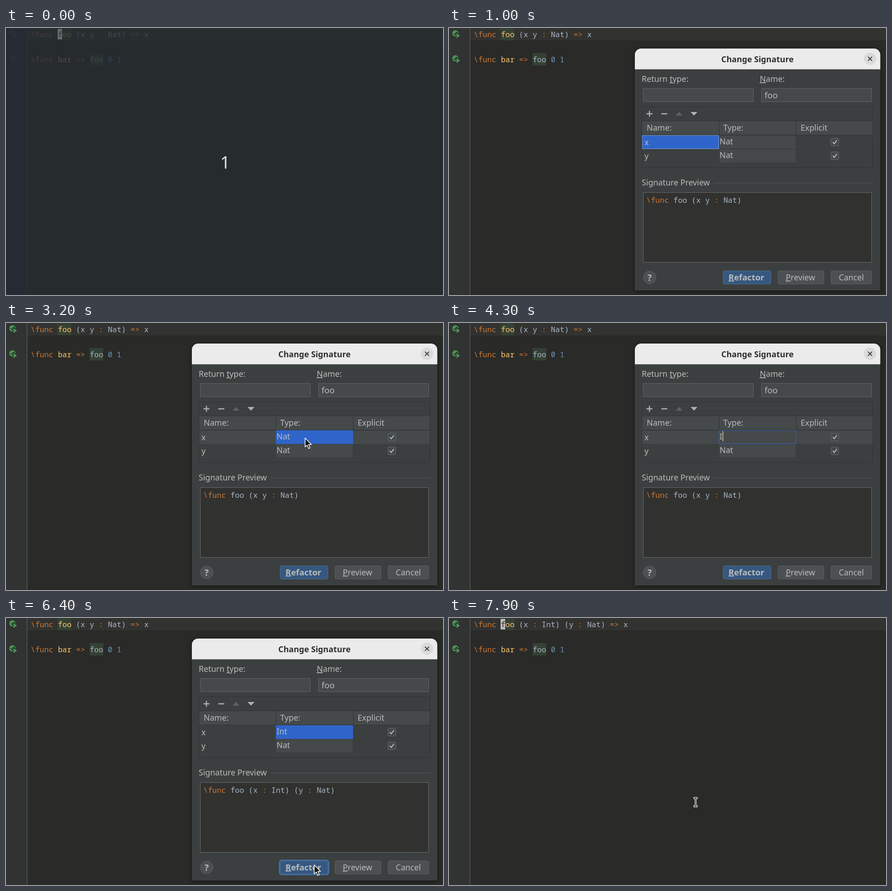
Write an HTML page that moves like this. It is 957 px wide and 585 px high and loops after 8000 ms.

```html
<!DOCTYPE html>
<html lang="en">
<head>
<meta charset="utf-8">
<title>Change Signature</title>
<style>
  html, body { margin: 0; width: 100%; height: 100%; overflow: hidden; background: #2a2a28; }
  svg { display: block; width: 957px; height: 585px; }
  text { white-space: pre; fill: #bbb; font: 17.7px "Noto Sans", "Open Sans", sans-serif; }
  .code { font: 16.57px "Noto Sans Mono", "DejaVu Sans Mono", monospace; fill: #a9b7c6; font-variant-ligatures: none; }
  .kw { fill: #cc7832; }
  .fn { fill: #ffc66d; }
  .num { fill: #6897bb; }
  .b { font-weight: 700; }
  .u { text-decoration: underline; }
  .field { fill: #45494a; stroke: #646464; }
  .cell { fill: #45494a; }
  .button { fill: #4c5052; stroke: #5e6060; }
  .rule { stroke: #323232; fill: none; }
  .sel { fill: #2f65ca; }
  #dialog { transform-origin: 675px 310px; }
</style>
</head>
<body>
<svg id="stage" viewBox="0 0 957 585" xmlns="http://www.w3.org/2000/svg">
  <defs>
    <g id="run">
      <circle cx="14" cy="11.8" r="6.8" fill="#499c54"/>
      <path d="M10.3 11.6l2.8 2.8 5-5.4" fill="none" stroke="#313332" stroke-width="2"/>
      <path d="M15.5 9.5V24l10-7.2z" fill="#499c54" stroke="#313332" stroke-width="2"/>
    </g>
    <g id="check">
      <rect x=".5" y=".5" width="17" height="17" rx="2.5" fill="#43494a" stroke="#6b6b6b"/>
      <path d="M4.5 9l3.2 3.6L13.5 4.8" fill="none" stroke="#bbb" stroke-width="2"/>
    </g>
  </defs>

  <rect width="957" height="585" fill="#2a2a28"/>
  <rect x="47" width="910" height="27" fill="#323230"/>
  <rect width="46" height="585" fill="#313332"/>
  <rect x="45.5" width="1.2" height="585" fill="#606160"/>
  <use href="#run"/>
  <use href="#run" y="54.7"/>
  <rect x="113" y="1" width="30" height="26" fill="#344134"/>
  <rect x="183" y="55" width="30" height="27" fill="#344134"/>
  <text id="line1" class="code" x="54" y="20"></text>
  <text id="line2" class="code" x="54" y="75"></text>
  <g id="caret">
    <rect x="113" y="2" width="10" height="23" fill="#bbb"/>
    <text class="code" x="113.6" y="20" style="fill:#2b332b">f</text>
  </g>

  <g id="dialog">
    <path d="M407 575V59a14 14 0 0 1 14-14H930.500a14 14 0 0 1 14 14V575z" fill="#3c3f3f" style="filter:drop-shadow(0 2px 5px rgba(0,0,0,.5))"/>
    <path d="M407 90.500V59a14 14 0 0 1 14-14H930.500a14 14 0 0 1 14 14V90.500z" fill="#ebebeb"/>
    <text class="b" x="675.5" y="74.5" text-anchor="middle" style="fill:#2e2e2e;font-size:17.8px">Change Signature</text>
    <circle cx="922" cy="67.300" r="13.500" fill="#dadada"/>
    <path d="M917.500 62.800l9 9m0-9l-9 9" stroke="#2e2e2e" stroke-width="1.700"/>

    <text x="422" y="118">Return <tspan class="u">t</tspan>ype:</text>
    <text x="680.5" y="118"><tspan class="u">N</tspan>ame:</text>
    <rect class="field" x="425.5" y="132.500" width="241" height="29"/>
    <rect x="432" y="156" width="2" height="2" fill="#a33f3f"/>
    <rect class="field" x="684.5" y="132.500" width="241" height="29"/>
    <text x="691" y="154" style="font-size:18.5px">foo</text>

    <rect class="cell" x="423" y="204" width="505" height="30"/>
    <rect id="row" class="cell" x="423" y="236" width="505" height="29"/>
    <path class="rule" d="M422.500 172.500H928.500V305.500H422.500zM423 203.500H928M423 234.500H928M591.500 205V234M760.500 205V234"/>
    <path d="M432.500 188h13m-6.500-6.500v13M465 188h13" stroke="#afb1b3" stroke-width="2.400"/>
    <path d="M496.500 192h15l-7.500-8z" fill="#5f6162"/>
    <path d="M529 184h15l-7.500 8z" fill="#afb1b3"/>
    <text x="433" y="225">Name:</text>
    <text x="600.5" y="225">Type:</text>
    <text x="770" y="225">Explicit</text>
    <rect class="cell" x="592" y="236" width="167" height="28"/>
    <rect class="cell" x="592" y="266" width="167" height="28"/>
    <rect id="nameSel" class="sel" x="423.5" y="235.500" width="167" height="29" stroke="#7ba4e4"/>
    <rect id="typeSel" class="sel" x="591" y="235" width="169" height="30"/>
    <rect id="typeEdit" x="591.5" y="235.500" width="168" height="29" fill="#45494a" stroke="#2f65ca"/>
    <text x="428" y="257">x</text>
    <text x="428" y="287">y</text>
    <text id="type" x="592.5" y="255"></text>
    <text x="592.5" y="285">Nat</text>
    <rect id="bar" y="237" width="1.500" height="22" fill="#ccc"/>
    <use href="#check" x="836" y="241"/>
    <use href="#check" x="836" y="271"/>

    <text x="422" y="344.5">Signature Preview</text>
    <path d="M580 339.500H929" stroke="#55585a"/>
    <rect x="425.5" y="360.500" width="500" height="153" fill="#31312f" stroke="#6a6a6a"/>
    <text id="preview" class="code" x="432" y="383"></text>

    <circle class="button" cx="439.5" cy="546.500" r="14"/>
    <text class="b" x="439.5" y="553.500" text-anchor="middle" style="font-size:19.5px">?</text>
    <rect id="ring" x="599" y="531" width="107.500" height="31" rx="5" fill="none" stroke="#3f6fa5" stroke-width="3"/>
    <rect x="600.5" y="532" width="104.500" height="29" rx="3.500" fill="#365880" stroke="#4c708c"/>
    <rect class="button" x="720.5" y="532" width="100.500" height="29" rx="3.500"/>
    <rect class="button" x="836.5" y="532" width="89" height="29" rx="3.500"/>
    <text class="b" x="612" y="552.500" style="font-size:18.4px"><tspan class="u">R</tspan>efactor</text>
    <text x="737.5" y="552.500"><tspan class="u">P</tspan>review</text>
    <text x="853.5" y="552.500">Cancel</text>
  </g>

  <g id="popup"></g>

  <g id="countdown">
    <rect width="957" height="585" fill="#262c30" opacity=".8"/>
    <rect width="46" height="585" fill="#262b36" opacity=".6"/>
    <rect x="113" y="2" width="10" height="23" fill="#666a6c"/>
    <text class="code" x="113.6" y="20" style="fill:#30363a">f</text>
    <text x="480" y="307.500" text-anchor="middle" style="font-size:37.5px;fill:#e2e2e2">1</text>
  </g>

  <path id="arrow" d="M0 0V19.500L4.500 15.500 7.700 23 11 21.600 7.900 14.200H13.800z" fill="#151515" stroke="#fff" stroke-width="1.500" stroke-linejoin="round"/>
  <g id="ibeam" fill="none">
    <path d="M-4.500-9H4.500M-4.500 9H4.500M0-9V9" stroke="#fff" stroke-width="3.800"/>
    <path d="M-3.500-9H3.500M-3.500 9H3.500M0-9V9" stroke="#111" stroke-width="1.400"/>
  </g>
</svg>
<script>
const LOOP = 8000, TICK = 100;
const $ = id => document.getElementById(id);
const show = (id, on) => { $(id).style.display = on ? '' : 'none'; };
const within = (t, a, b) => t >= a && t < b;

// Value of a stepped table [[time, value], ...] at time t
const step = (table, t) => table.reduce((v, [at, next]) => t >= at ? next : v, table[0][1]);

function setHtml(id, html) {
  const el = $(id);
  if (el.markup !== html) el.innerHTML = el.markup = html;
}

function paint(src, named) {
  const html = src.replace(/\\func|=>|:|\b\d\b/g, m =>
    `<tspan class="${/\d/.test(m) ? 'num' : 'kw'}">${m.replace('>', '&gt;')}</tspan>`);
  return named ? html.replace(/(<\/tspan> )(\w+)/, '$1<tspan class="fn">$2</tspan>') : html;
}

const OLD = '\\func foo (x y : Nat)', NEW = '\\func foo (x : Int) (y : Nat)';
const TYPE = [[0, 'Nat'], [4300, 'I'], [4600, 'In'], [4800, 'Int']];
const PREVIEW = [[0, OLD], [4400, NEW.replace('Int', 'I')], [5000, NEW]];
const HINTS = [[0, []], [4400, ['I', 'Int', 'Iso', 'Idp', 'Inv']], [4600, ['Int', 'Inv']], [4900, []]];
const OPENING = [[0, [0, 1]], [800, [.4, .9]], [900, [.85, .98]], [1000, [1, 1]]];
const COUNT = [[0, 1], [100, .4], [200, 0]];
const BAR_X = { Nat: 623.5, I: 599, In: 610, Int: 616 };

const TO_CELL = [[1900, 379, 19], [2000, 455, 81], [2100, 455, 81], [2300, 520, 148],
  [2500, 620, 235], [2700, 652, 256], [2800, 655, 252]];
const TO_BUTTON = [[5100, 655, 252], [5300, 660, 285], [5500, 675, 390], [5700, 688, 495], [5900, 675, 541]];
const TO_EDITOR = [[6600, 675, 541.5], [6800, 656, 521], [7200, 560, 424], [7400, 540, 403.5]];

function along(path, t) {
  const i = path.findIndex(p => p[0] > t);
  if (i < 1) return path.at(i).slice(1);
  const [a, b] = [path[i - 1], path[i]], k = (t - a[0]) / (b[0] - a[0]);
  return [1, 2].map(n => a[n] + (b[n] - a[n]) * k);
}

function place(id, path, t) {
  $(id).setAttribute('transform', `translate(${along(path, t)})`);
}

function popupHtml(items) {
  if (!items.length) return '';
  const row = (name, i) => {
    const y = 267 + i * 24;
    return `${i ? '' : `<rect x="561" y="${y}" width="400" height="24" fill="#113a5c"/>`}
      <circle cx="577" cy="${y + 12}" r="6" fill="#b88a4a"/>
      <text class="code" x="592.5" y="${y + 18}">${name}</text>`;
  };
  return `<rect x="560.5" y="266.500" width="410" height="${items.length * 24 + 1}" fill="#46484a" stroke="#616365"/>`
    + items.map(row).join('');
}

function render(t) {
  const open = within(t, 800, 6500), done = t >= 6500;
  const type = step(TYPE, t), editing = within(t, 3300, 5000);

  setHtml('line1', paint((done ? NEW : OLD) + ' => x', true));
  show('caret', t < 800 || done && !within(t, 7200, 7900));
  show('countdown', t < 200);
  $('countdown').style.opacity = step(COUNT, t);

  const [alpha, scale] = step(OPENING, t);
  show('dialog', open);
  $('dialog').style.opacity = alpha;
  $('dialog').style.transform = scale < 1 ? `scale(${scale})` : 'none';

  show('nameSel', t < 3200);
  show('row', within(t, 3200, 5200));
  show('typeSel', within(t, 3200, 3300) || t >= 5000);
  show('typeEdit', editing);
  show('bar', within(t, 3400, 4100) || within(t, 4300, 5000));
  $('bar').setAttribute('x', BAR_X[type]);
  setHtml('type', type);
  setHtml('preview', paint(step(PREVIEW, t)));
  setHtml('popup', popupHtml(step(HINTS, t)));
  show('ring', t >= 6300);

  show('arrow', within(t, 1900, 3400) || within(t, 5200, 6500));
  place('arrow', t < 4000 ? TO_CELL : TO_BUTTON, t);
  show('ibeam', done);
  place('ibeam', TO_EDITOR, t);
}

setHtml('line2', paint('\\func bar => foo 0 1', true));
const start = performance.now();
function frame() {
  const t = (performance.now() - start) % LOOP;
  render(Math.floor(t / TICK) * TICK);
  requestAnimationFrame(frame);
}
frame();
</script>
</body>
</html>
```
